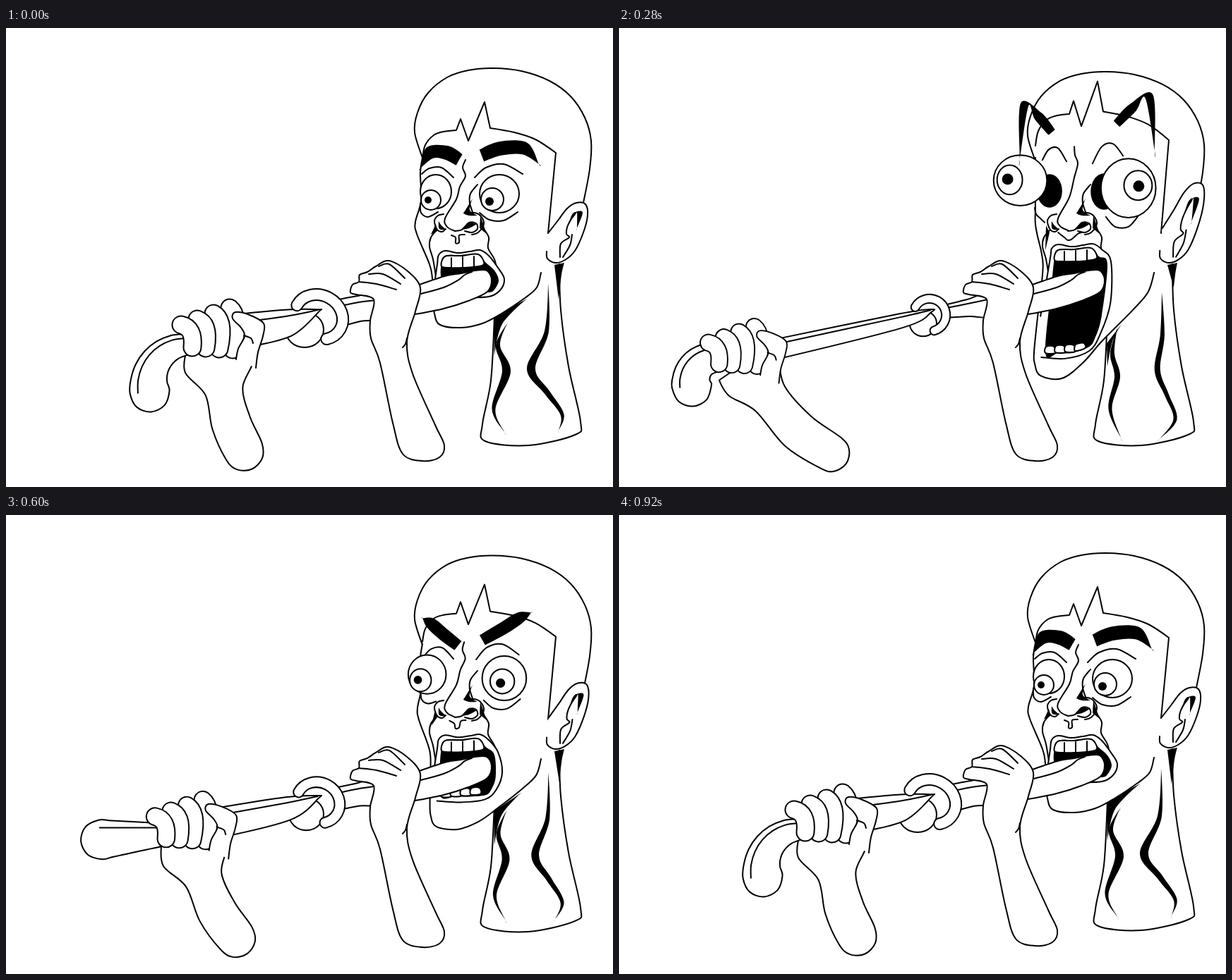
Animation of 860 by 651 pixels, one loop 0.96 s. Source, as an HTML page with a canvas:

```html
<!DOCTYPE html>
<html lang="en">
<head>
<meta charset="utf-8">
<title>Tongue pull</title>
<style>
  html, body { margin: 0; width: 100%; height: 100%; overflow: hidden; background: #fff; }
  canvas { display: block; }
</style>
</head>
<body>
<canvas id="stage" width="860" height="651"></canvas>
<script>
const ctx = document.getElementById('stage').getContext('2d');
const LOOP = 960, STEP = 40, PEN = 2;

const clamp = u => Math.max(0, Math.min(1, u));
const ease = u => clamp(u) ** 2 * (3 - 2 * clamp(u));
const ramp = (t, start, end) => ease((t - start) / (end - start));
const lerp = (a, b, u) => a + (b - a) * u;

// "x,y" points; "!" marks a sharp corner
const points = text => text.split(' ').map(token => {
  const [x, y] = token.replace('!', '').split(',').map(Number);
  return [x, y, token.endsWith('!')];
});
const mix = (a, b, u) => a.map(([x, y, sharp], i) => [lerp(x, b[i][0], u), lerp(y, b[i][1], u), sharp]);
const morph = (a, b, u) => mix(points(a), points(b), u);

// Smooth curve through the points
function trace(list, closed) {
  const n = list.length;
  const at = i => list[closed ? (i + n) % n : Math.max(0, Math.min(n - 1, i))];
  const handle = (i, axis) => at(i)[2] ? 0 : (at(i + 1)[axis] - at(i - 1)[axis]) / 6;
  ctx.beginPath();
  ctx.moveTo(list[0][0], list[0][1]);
  for (let i = 0; i < (closed ? n : n - 1); i++) {
    const [ax, ay] = at(i), [bx, by] = at(i + 1);
    ctx.bezierCurveTo(ax + handle(i, 0), ay + handle(i, 1),
      bx - handle(i + 1, 0), by - handle(i + 1, 1), bx, by);
  }
}

function fill(color) {
  ctx.fillStyle = color;
  ctx.fill();
}
function line(list) {
  trace(list);
  ctx.stroke();
}
function shape(list, closed = false) {
  trace(list, closed);
  fill('#fff');
  ctx.stroke();
}
function ink(list) {
  trace(list, true);
  fill('#000');
}
function oval([x, y, rx, ry], solid) {
  ctx.beginPath();
  ctx.ellipse(x, y, rx, ry, 0, 0, Math.PI * 2);
  fill(solid ? '#000' : '#fff');
  if (!solid) ctx.stroke();
}

// Outlined white band along the current path
function band(width) {
  ctx.lineWidth = width + PEN;
  ctx.stroke();
  ctx.strokeStyle = '#fff';
  ctx.lineWidth = width - PEN;
  ctx.stroke();
  ctx.strokeStyle = '#000';
  ctx.lineWidth = PEN;
}

// Spine moved sideways by a width for each point
function offset(spine, widths) {
  return spine.map(([x, y], i) => {
    const [ax, ay] = spine[Math.max(0, i - 1)];
    const [bx, by] = spine[Math.min(spine.length - 1, i + 1)];
    const length = Math.hypot(bx - ax, by - ay);
    return [x - (by - ay) / length * widths[i], y + (bx - ax) / length * widths[i], i === 0];
  });
}

// Outline of a spine with varying half width, optionally with a round end
function ribbon(spine, widths, round) {
  const [[ax, ay], [bx, by]] = spine.slice(-2);
  const heading = Math.atan2(by - ay, bx - ax), radius = widths.at(-1);
  const cap = !round ? [] : [1, 0, -1].map(k => {
    const angle = heading + k * Math.PI / 4;
    return [bx + radius * Math.cos(angle), by + radius * Math.sin(angle)];
  });
  return [...offset(spine, widths), ...cap, ...offset(spine, widths.map(w => -w)).reverse()];
}

function drawNeck(g) {
  shape(points('692,410 687,500 675,562 679,586 740,592 806,577 814,558 797,480 786,400 784,335'));
  ink(ribbon(morph('711,418 697,450 709,487 691,540 706,573', '706,425 699,462 706,495 696,540 711,581', g),
    [0, 3, 6 - 2 * g, 2.5, 0]));
  ink(ribbon(morph('768,362 766,430 744,483 766,516 788,548 783,571', '769,375 770,435 763,485 776,520 788,555 766,583', g),
    [0, 3, 6 - 2 * g, 4 - g, 2.5, 0]));
  ink(morph('777,336! 791,333! 787,350 783,385!', '777,336 791,333 788,350 786,368', g));
  ink(morph('691,410! 738,384! 703,420 692,465!', '691,448 712,420 699,445 692,480', g));
}

function drawHead(g, whip) {
  const skull = points('590,184 579,148 583,120 598,92 625,70 655,60 690,57 730,61 770,75 800,97 820,127 829,160 827,200 818,248');
  shape(skull.map(([x, y]) => [x, y + 5 * g]));

  // The jaw drops away from its hinge near the ear
  const sag = (list, drop, slope, lift) => list.map(([x, y, sharp]) => {
    const k = g * ramp(y, 348, 362);
    return [x - 18 * k * clamp((760 - x) / 60), y + k * Math.min(drop, slope * (762 - x)) - (y < 348 ? lift * g : 0), sharp];
  });
  const face = points('590,184 587,205 588,245 580,275 582,292 600,335 604,355 606,385 607,405 615,421 645,425 675,419 702,405 735,383 752,368 758,347');
  shape(sag(face, 73, .65, 0).map(([x, y]) => [x + 11 * g * Math.exp(-(((y - 285) / 30) ** 2)), y]));

  const fringe = points('590,184 594,166 606,152 620,147 638,145! 644,129! 655,160! 678,105! 686,142! 720,148 750,158 779,177! 768,291!');
  const stretch = 1 + .16 * g * (1 - .4 * whip);
  line(fringe.map(([x, y, sharp]) => [x, 291 - (291 - y) * stretch, sharp]));

  const perk = list => list.map(([x, y, sharp]) => {
    const k = g * ((335 - y) / 87) ** 2;
    return [x + 7 * k, y - 28 * k, sharp];
  });
  shape(perk(points('768,291! 782,273 795,256 808,248 821,250 824,266 818,290 806,316 792,329 778,333 767,327 766,317')));
  line(perk(points('806,262 796,280 794,292 798,297 786,306 785,325')));
  line(perk(points('802,293 799,308 789,325')));
  ink(ribbon(perk(points('798,276 805,264 813,262 809,284')), [0, 2, 4, 0]));

  drawNose(g);

  const mouth = text => sag(points(text), 88, 1, 9);
  shape(mouth('608,356 611,335 613,322 622,316 641,319 657,317 672,315 684,323 697,340 706,356 700,372 684,381 650,382 616,380'));
  ink(mouth('616,352 617,335 622,323 645,322 668,321 680,333 692,344 698,358 692,371 684,375 660,374 640,374 622,374'));
  shape(mouth('617,338 622,324 645,323 669,321 677,335 662,339 646,340 630,340'), true);
  for (let i = 0; i < 3; i++) line(mouth(`${631 + 16 * i},${326 - i} ${631 + 16 * i},${340 - i}`));
  for (let i = 0; i < 4; i++) {
    const x = 622 + 14 * i, y = 365 - i;
    shape(mouth(`${x},${y + 9} ${x + 1},${y} ${x + 12},${y} ${x + 14},${y + 9}`), true);
  }
}

function drawNose(g) {
  line(morph('651,187 647,198 651,210 643,225 638,243 622,270 625,282 636,288',
    '645,168 646,180 650,192 645,212 638,240 622,270 625,281 636,287', g));
  line(points('668,222 658,235 657,248 662,264'));
  line(points('620,264 612,266 607,274 611,286 618,289 623,285'));
  line(points('636,288 646,286 656,276 666,277 668,285 660,290 650,288'));
  line(points('652,264 663,262 672,266 677,278 669,290 660,293'));
  ink(points('661,242! 657,258 668,266! 656,266 648,263!'));
  ink(points('613,274! 617,280 624,286! 614,285'));
  ink(points('645,286! 656,276 667,278! 656,284'));
  ink(morph('609,278! 602,293! 611,288!', '605,280 604,316 610,290', g));
  ink(points('672,266! 681,292! 671,284!'));
  line(morph('631,294 637,297 637,305 642,304 642,294 650,293', '622,290 631,297 636,301 642,299 650,292 655,290', g));
  line(points('677,285 684,297 683,312 692,328 696,345'));
  line(points('610,287 602,297 600,310 605,328 609,352'));
}

function drawEyes(g) {
  line(morph('589,207 600,199 617,198 634,212', '600,187 609,172 622,170 634,189', g));
  line(morph('664,212 680,198 705,193 732,207', '671,192 684,168 700,164 714,181', g));
  line(morph('587,249 588,262 598,268 612,261', '589,255 591,264 597,270 603,276', g));
  line(morph('671,262 685,272 705,273 725,261', '690,268 703,282 722,282 737,265', g));

  // Socket, ball, iris and pupil of each eye: x, y and radii at rest and bulging
  const eyes = [
    [[608, 232, 10, 10], [610, 231, 18, 24]], [[609, 232, 22, 24], [568, 216, 38, 36]],
    [[602, 244, 14, 14], [553, 215, 18, 21]], [[598, 244, 5, 5], [550, 214, 8, 8]],
    [[697, 235, 10, 10], [687, 232, 19, 26]], [[699, 235, 28, 27], [722, 227, 39, 42]],
    [[689, 243, 16, 16], [736, 223, 20, 21]], [[685, 246, 6, 6], [737, 224, 8, 8]]
  ];
  eyes.forEach(([rest, bulge], i) => oval(rest.map((v, k) => lerp(v, bulge[k], g)), i % 4 === 0 || i % 4 === 3));
}

function drawBrows(t, g) {
  const calm = '674,181 700,171 735,171 755,193';
  let spine = points(calm);
  for (const [pose, start, end] of [
    ['705,136 728,113 751,97 759,174', 0, 280],
    ['686,152 718,122 754,74 767,111', 280, 400],
    ['676,176 705,155 722,122 733,86', 400, 520],
    [calm, 520, 680]
  ]) spine = mix(spine, points(pose), ramp(t, start, end));

  const widths = [.9, 1, .9, 0].map(w => w * (10 - 3.5 * g));
  ink(ribbon(spine, widths));
  ink(ribbon(spine.map(([x, y]) => [655 - (x - 655) * (.68 + .16 * g), y + 6 + 6 * g]), widths));
}

function drawTongue(g, gripX, gripY) {
  shape(points('575,368 600,359 625,351 645,348 665,344 681,344 688,357 682,374 655,387 620,398 575,407'));
  line(points('588,377 620,368 640,358 650,350 660,346'));

  const neck = morph('470,405 500,398 530,394', '462,402 495,397 530,392', g);
  const neckWidths = [19 - 10 * g, 18 - 6 * g, 17];
  shape(ribbon(neck, neckWidths), true);
  line(offset(neck, neckWidths.map(w => -w / 2)));

  oval([423 + 8 * g, 428 - 9 * g, 27 - 8 * g, 25 - 7 * g]);
  const strand = [[gripX + 103, gripY + 47], [400, 418 - 3 * g], [442, 401]];
  const widths = [24 - 10 * g, 19 - 9 * g, 2];
  shape(ribbon(strand, widths), true);
  line(offset(strand, widths.map(w => -w / 2)));
  ctx.beginPath();
  ctx.ellipse(443 - 3 * g, 410 - 3 * g, 35 - 12 * g, 31 - 8 * g, .5, Math.PI, Math.PI * 2.25);
  band(16 - 4 * g);
}

function drawNearArm() {
  shape(points('521,385 496,378 488,375 491,364 500,360 501,350 512,346 524,338 542,330 568,344 587,368 580,402 568,445 576,490 608,563 621,592 614,609 590,614 562,604 548,560 530,475 517,440 516,415'), true);
  for (let i = 0; i < 3; i++) {
    line([[500 + 14 * i, 360 - 11 * i], [525 + 9 * i, 363 - 14 * i], [553 + 6 * i, 371 - 8 * i]]);
  }
  line(points('568,440 566,448 562,453'));
}

function drawFarArm(g, curl, gripX, gripY) {
  const spine = mix([[298, 450], [302, 480], [309, 515], [319, 560], [337, 600]],
    [[175, 476], [189, 496], [213, 526], [253, 572], [300, 603]], g);
  shape(ribbon(spine, [42, 49 - 6 * g, 27, 28, 28 - 2 * g], true), true);

  // The tip bends down by curling along its length
  const parts = 6, length = 95 - 38 * g;
  const tip = [[gripX + 19, gripY + 67 - 9 * g]], widths = [15 + 6 * g];
  for (let i = 1; i <= parts; i++) {
    const [x, y] = tip[i - 1], angle = Math.PI - .08 - curl * 1.7 * (i - .5) / parts;
    tip.push([x + Math.cos(angle) * length / parts, y + Math.sin(angle) * length / parts]);
    widths.push(lerp(15 + 6 * g, 28, i / parts));
  }
  shape(ribbon(tip, widths, true), true);
  line(offset(tip, widths.map(w => w * .6)));

  ctx.save();
  ctx.translate(gripX, gripY);
  ctx.scale(1 - .06 * g, 1 - .06 * g);
  for (let i = 3; i >= 0; i--) {
    ctx.beginPath();
    ctx.moveTo(13 + 23 * i, 39 - 8 * i);
    ctx.quadraticCurveTo(32 + 22 * i, 43 - 5 * i, 29 + 19 * i, 71 + i);
    band(25);
  }
  shape(points('91,88 94,73 103,55 98,43 86,30 90,21 110,25 130,37 129,55 122,78 119,100'));
  line(points('102,54 112,58 115,65'));
  ctx.restore();
}

function draw(t) {
  const gape = ramp(t, 0, 300) * (1 - ramp(t, 460, 680));
  const whip = ramp(t, 280, 380) * (1 - ramp(t, 640, 900));
  const gripX = 235 - 122 * gape, gripY = 382 + 28 * gape;

  ctx.setTransform(1, 0, 0, 1, 0, 0);
  ctx.fillStyle = '#fff';
  ctx.fillRect(0, 0, 860, 651);
  ctx.translate(0, -3 * ramp(t, 560, 660));
  ctx.lineWidth = PEN;
  ctx.lineCap = ctx.lineJoin = 'round';

  drawNeck(gape);
  drawHead(gape, whip);
  drawEyes(gape);
  drawBrows(t, gape);
  drawTongue(gape, gripX, gripY);
  drawNearArm();
  drawFarArm(gape, 1 - whip, gripX, gripY);
}

function tick() {
  draw(Math.floor(performance.now() % LOOP / STEP) * STEP);
  requestAnimationFrame(tick);
}
tick();
</script>
</body>
</html>
```
